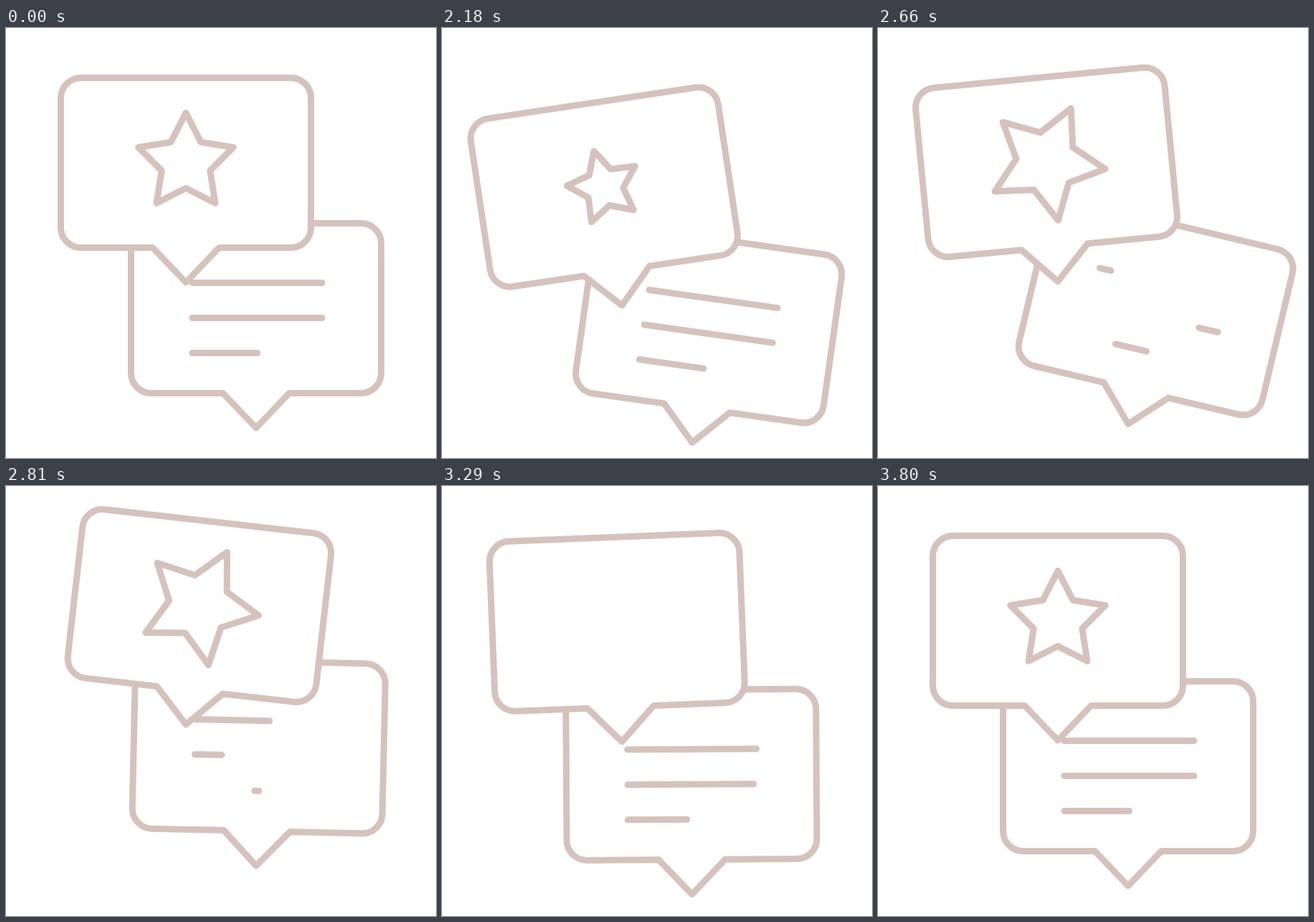
An HTML page with a canvas that plays this animation: 600 px wide and 600 px high, repeating every 3.83 s.

```html
<!DOCTYPE html>
<html lang="en">
<head>
<meta charset="utf-8">
<title>Chat bubbles</title>
<style>
html, body { margin: 0; width: 100%; height: 100%; overflow: hidden; background: #fff; }
canvas { display: block; width: 600px; height: 600px; }
</style>
</head>
<body>
<canvas id="stage" width="600" height="600"></canvas>
<script>
const ctx = document.getElementById('stage').getContext('2d');
const LOOP = 3830, REST = 2000, STEP = 30;

const clamp = v => Math.min(1, Math.max(0, v));
const rad = deg => deg * Math.PI / 180;
const part = (n, a, b) => clamp((n - a) / (b - a));

// Eased progress from step a to step b.
function glide(n, a, b) {
  const p = part(n, a, b);
  return p * p * (3 - 2 * p);
}

// Swing out to `far`, wait, swing past rest to `dip`, over to `over`, then settle.
function sway(n, far, dip, over, reach, leave, low, high, end) {
  return far * glide(n, 0, reach)
    + (dip - far) * glide(n, leave, low)
    + (over - dip) * glide(n, low, high)
    - over * glide(n, high, end);
}

// Bubble outline with the tip of its tail at 0,0.
function bubblePath() {
  const w = 174.5, top = -285.5, bottom = -48.5, notch = 46.3, r = 28;
  ctx.beginPath();
  ctx.moveTo(0, 0);
  ctx.lineTo(-notch, bottom);
  ctx.arcTo(-w, bottom, -w, top, r);
  ctx.arcTo(-w, top, w, top, r);
  ctx.arcTo(w, top, w, bottom, r);
  ctx.arcTo(w, bottom, 0, bottom, r);
  ctx.lineTo(notch, bottom);
  ctx.closePath();
}

function drawBubble(x, y, turn, content) {
  ctx.save();
  ctx.translate(x, y);
  ctx.rotate(rad(turn));
  bubblePath();
  ctx.fill();
  ctx.stroke();
  content();
  ctx.restore();
}

// Each line is wiped away from its start, then drawn again with a slow finish.
function drawLines(n) {
  for (let i = 0; i < 3; i++) {
    const y = -202.5 + 49 * i, len = i < 2 ? 181 : 90.5;
    const out = 9 + 2.75 * i, back = 21.3 + 4 * i;
    const from = n < back ? glide(n, out, back) : 0;
    const to = n < back ? 1 : 1 - Math.pow(1 - part(n, back, back + 30), 4);
    if (to - from < 0.001) continue;
    ctx.beginPath();
    ctx.moveTo(-89 + from * len, y);
    ctx.lineTo(-89 + to * len, y);
    ctx.stroke();
  }
}

function drawStar(n) {
  const turn = sway(n, -15, 360, 353.5, 12, 18, 36.5, 43, 43)
    + 353.5 * glide(n, 43, 43.001) + 6.5 * glide(n, 43, 54);
  const size = 1 - 0.3 * glide(n, 0, 8) + 0.52 * glide(n, 8, 24.5) - 0.22 * glide(n, 24.5, 40);
  ctx.beginPath();
  for (let i = 0; i < 10; i++) {
    const a = rad(turn + 36 * i), r = size * (i % 2 ? 35.6 : 69.6);
    ctx.lineTo(r * Math.sin(a), -167 - r * Math.cos(a));
  }
  ctx.closePath();
  ctx.stroke();
}

function draw(t) {
  const n = Math.max(0, Math.floor((t - REST) / STEP));
  ctx.clearRect(0, 0, 600, 600);
  ctx.fillStyle = '#fff';
  ctx.strokeStyle = '#d6c2bd';
  ctx.lineWidth = 9;
  ctx.lineCap = ctx.lineJoin = 'round';
  drawBubble(349, 558 + sway(n, 27.5, -29, 12, 9, 14.5, 28, 42, 54),
    sway(n, 15, -7, 3, 11.5, 20, 32, 50, 60), () => drawLines(n));
  drawBubble(251, 355 + sway(n, 38, -24.5, 5, 8, 12, 29, 37, 47),
    sway(n, -15, 7, -3.1, 11, 17, 28, 38, 53), () => drawStar(n));
}

const start = performance.now();
function tick() {
  draw((performance.now() - start) % LOOP);
  requestAnimationFrame(tick);
}
tick();
</script>
</body>
</html>
```
